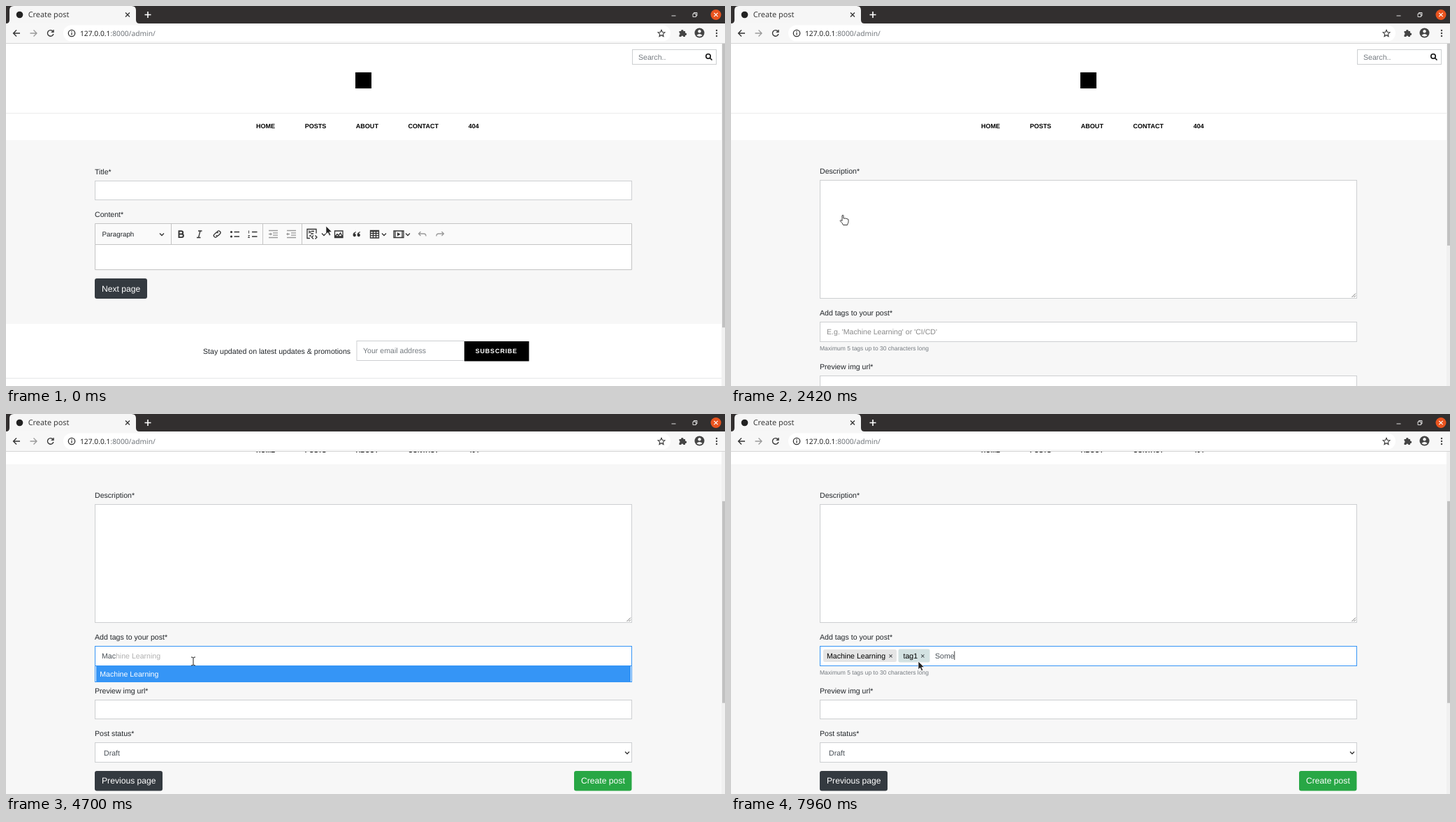
These frames come from a looping animation (1029x544 px, 8 s). An HTML page:

```html
<!DOCTYPE html>
<html lang="en">
<head>
<meta charset="utf-8">
<title>Create post</title>
<style>
  html, body { margin: 0; width: 100%; height: 100%; overflow: hidden; background: #fff; }
  svg { display: block; }
  text { font: 10.58px "Liberation Sans", Arial, sans-serif; fill: #212529; text-rendering: geometricPrecision; white-space: pre; }
  .nav text { font-size: 9.04px; font-weight: bold; fill: #000; }
  .ui text { font: 10.9px "Noto Sans", "Open Sans", sans-serif; fill: #3c3c3c; }
  .ui .url { font-size: 10.25px; fill: #222; }
  .field { fill: #fff; stroke: #cdcfd1; }
  .muted { fill: #757b80; }
  .foot text { fill: #838383; }
  .button text { font-size: 12.15px; fill: #fff; }
  .line { fill: none; stroke: #333; stroke-width: 1.3; }
  .off { stroke: #9a9a9a; }
</style>
</head>
<body>
<svg width="1029" height="544" viewBox="0 0 1029 544">
  <defs>
    <path id="chevron" class="line" d="M-3-1.5 0 1.5 3-1.5"/>
    <clipPath id="below"><path d="M120 361h790v200h-790z"/></clipPath>
  </defs>

  <g id="page">
    <rect class="field" x="896.5" y="62.5" width="120" height="21"/>
    <text class="muted" x="905" y="76.5">Search..</text>
    <g fill="none" stroke="#111" stroke-width="1.6"><circle cx="1005" cy="72" r="3.2"/><path d="m1007.3 74.3 3.2 3.2"/></g>
    <rect x="500" y="95" width="23" height="23"/>
    <path d="M0 153.5h1024" stroke="#ececec"/>
    <g class="nav">
      <text x="358" y="175">HOME</text><text x="427.7" y="175">POSTS</text><text x="500.8" y="175">ABOUT</text>
      <text x="575.5" y="175">CONTACT</text><text x="661.7" y="175">404</text>
    </g>

    <g id="write">
      <path d="M0 192h1024v263H0z" fill="#f7f7f7"/>
      <text x="127" y="240.5">Title*</text>
      <rect class="field" x="127.5" y="250.5" width="768" height="27"/>
      <text x="127" y="301.5">Content*</text>
      <g stroke="#c4c4c4">
        <path d="M127.5 311.5h768v30h-768z" fill="#fafafa"/>
        <path d="M127.5 341.5h768v36h-768z" fill="#fff"/>
        <path d="M236.5 312v29M367.5 312v29M423.5 312v29"/>
      </g>
      <text x="137.5" y="330" style="font-size:9.82px">Paragraph</text>
      <use href="#chevron" x="223" y="327"/><use href="#chevron" x="455" y="327"/>
      <use href="#chevron" x="541" y="327"/><use href="#chevron" x="575" y="327"/>
      <g class="line">
        <path d="M247.5 322.3h3.3q2.4 0 2.4 2.1t-2.4 2.1h-3.3h3.8q2.6 0 2.6 2.3t-2.6 2.3h-3.8z" stroke-width="1.9"/>
        <path d="M275 322h5.500M273 331.500h5.500M278 322l-2.500 9.500"/>
        <path d="m300.500 325 2.200-2.200a2.400 2.400 0 0 1 3.500 3.500l-2.200 2.200q-1.800 1.400-3.500-.300M303.800 328.200l-2.200 2.200a2.400 2.400 0 0 1-3.500-3.500l2.200-2.200q1.800-1.400 3.500.300"/>
        <path d="M326.500 323.500h7.500M326.500 330h7.500M352 323.500h7.500M352 330h7.500"/>
        <path d="M347.500 321.500v4M346.500 328.500h2l-2 3h2.500" stroke-width=".9"/>
        <path class="off" d="M376 321.500h13M382 324.800h7M382 328.100h7M376 331.500h13M376 326.500h4m-1.500-1.500 1.500 1.500-1.500 1.500M402 321.500h13M408 324.800h7M408 328.100h7M402 331.500h13M406 326.500h-4m1.500-1.500-1.500 1.500 1.500 1.500"/>
        <path d="M435 332.500h-4v-13h13v6M433 322l3 1.500-3 1.500M437 322.500h4M436 326h4M434 329h3M440 328.500l-2.500 2.500 2.500 2.500M442.500 328.500l2.500 2.500-2.500 2.500"/>
        <path d="M470.500 322h11.500v9.500h-11.500zM471 330l3-3.500 2 2 2.500-3.500 3 5z"/>
        <path d="M521.500 321.500h12v10.500h-12zM521.500 322.500h12M521.500 325.500h12M521.500 328.700h12M525.500 322v10M529.500 322v10"/>
        <path d="M555 322h14v9.500h-14zM557 322v9.500M567 322v9.500"/>
        <path class="off" d="M593.500 323l-3 3 3 3M591 326h7q3 0 3 3.500M623.500 323l3 3-3 3M626 326h-7q-3 0-3 3.500"/>
      </g>
      <g fill="#333">
        <circle cx="322.500" cy="323.500" r="1.600"/><circle cx="322.500" cy="330" r="1.600"/>
        <path d="M560 324v5.500l4.500-2.800zM501 323q-4.500 1-4.500 5a2.200 2.200 0 1 0 2.600-2.200q0-1.500 1.900-1.900zM507 323q-4.500 1-4.500 5a2.200 2.200 0 1 0 2.600-2.200q0-1.500 1.900-1.900z"/>
      </g>
      <g class="button"><rect id="next" x="127" y="390" width="75" height="29" rx="3"/><text x="137" y="408.500">Next page</text></g>
      <text x="282" y="497.500">Stay updated on latest updates &amp; promotions</text>
      <rect class="field" x="502" y="479.500" width="154" height="28"/>
      <text class="muted" x="511" y="497">Your email address</text>
      <path d="M656 480h92.500v28.500H656z"/>
      <text x="671.800" y="497" style="font-size:9.04px;font-weight:bold;letter-spacing:.75px;fill:#fff">SUBSCRIBE</text>
      <path d="M0 533h1024" stroke="#e2e3e5"/>
      <g class="foot">
        <rect x="144" y="576" width="14" height="14"/>
        <text x="456" y="590">Home</text><text x="493.500" y="590">About</text><text x="530" y="590">Contact</text>
        <g fill="#777"><circle cx="853" cy="586" r="4"/><circle cx="870" cy="586" r="4"/><circle cx="888.500" cy="586" r="4"/></g>
      </g>
    </g>

    <g id="details" transform="translate(0 120)">
      <path d="M0 72h1024v503H0z" fill="#f7f7f7"/>
      <text x="127" y="120">Description*</text>
      <rect class="field" x="127.500" y="129.500" width="768" height="169"/>
      <path d="m888.500 297 5.500-5.500m-2.500 5.500 2.500-2.500" stroke="#555" stroke-width=".8"/>
      <text x="127" y="323">Add tags to your post*</text>
      <rect id="tagField" class="field" x="127.500" y="332.500" width="768" height="28"/>
      <text class="muted" x="127" y="373" style="font-size:8.500px">Maximum 5 tags up to 30 characters long</text>
      <text x="127" y="399.500">Preview img url*</text>
      <rect class="field" x="127.500" y="409.500" width="768" height="27"/>
      <text x="127" y="461">Post status*</text>
      <rect class="field" x="127.500" y="470.500" width="768" height="28"/>
      <text x="140" y="488.500" style="fill:#495057">Draft</text>
      <use href="#chevron" x="889" y="485"/>
      <g class="button">
        <rect x="127" y="511" width="97" height="28.500" rx="3" fill="#343a40"/><text x="137" y="529">Previous page</text>
        <rect x="813" y="511" width="82.500" height="28.500" rx="3" fill="#28a745"/><text x="823" y="529">Create post</text>
      </g>
      <g id="tagA"><rect x="132" y="337" width="105" height="18" rx="2.300" fill="#e5e5e5"/><text x="137" y="349.500" style="fill:#000">Machine Learning</text><text x="225.500" y="349.500">×</text></g>
      <g id="tagB"><rect x="239.500" y="336.500" width="45" height="19" rx="2.300" fill="#d3e2e2"/><text x="246.500" y="349.500" style="fill:#000">tag1</text><text x="271.200" y="349.500">×</text></g>
      <text id="placeholder" y="349.500" style="fill:#8a8a8a">E.g. 'Machine Learning' or 'CI/CD'</text>
      <text id="entry" y="349.500"><tspan id="typed" fill="#495057"></tspan><tspan id="hint" fill="#b0b0b0"></tspan></text>
      <path id="caret" d="M.500 339.500v12.500" stroke="#111" stroke-width=".8"/>
      <g id="list" clip-path="url(#below)">
        <rect id="listBox" x="127.500" y="350" width="768" fill="#fff" stroke="#3595f6"/>
        <rect id="active" x="129" y="361" width="765" height="22" fill="#3595f6"/>
        <g id="items"></g>
      </g>
    </g>
  </g>

  <path d="M1024 54h5v490h-5z" fill="#f1f1f1"/>
  <rect id="thumb" x="1025" width="4" fill="#c1c1c1"/>

  <g class="ui">
    <path d="M0 0h1029v25H0z" fill="#322f2f"/>
    <path d="M0 25q5 0 5-5V6q0-6 6-6h169q6 0 6 6v14q0 5 5 5z" fill="#f6f6f6"/>
    <path d="M0 25h1029v28H0z" fill="#f7f7f7"/>
    <rect x="82" y="27.500" width="869" height="23" rx="11.500" fill="#fff"/>
    <path d="M0 53.500h1029" stroke="#d5d5d5"/>
    <circle cx="19.500" cy="12.500" r="4.800" fill="#222"/>
    <text x="31.700" y="16">Create post</text>
    <text class="url" x="106" y="42.500">127.0.0.1<tspan fill="#70757a">:8000/admin/</tspan></text>
    <path class="line" d="m171 9.500 6 6m0-6-6 6"/>
    <path d="M198.500 12.500h9m-4.500-4.500v9" stroke="#fff" stroke-width="1.600"/>
    <path d="M952.500 14h6M983 11h4.500v4.500h-4.500zM984.500 11V9.500h4.500v4.500h-1.500" fill="none" stroke="#ddd"/>
    <circle cx="1016" cy="12.500" r="7.500" fill="#e9541f"/>
    <path d="m1013.300 9.800 5.400 5.400m0-5.400-5.400 5.400" stroke="#fff" stroke-width="1.200"/>
    <g class="line" stroke-width="1.500">
      <path d="M20 39H10.500m4.500-4.500-4.500 4.500 4.500 4.500"/>
      <path class="off" d="M34.500 39H44m-4.500-4.500 4.500 4.500-4.500 4.500"/>
      <path d="M67.300 36.500a4.300 4.300 0 1 0 .600 3.500M68 34v3.300h-3.300"/>
      <circle cx="94" cy="39" r="4.700"/><path d="M94 38.300v3.200M94 36v1.200"/>
      <path d="m938 34.300 1.400 3.200 3.500.300-2.700 2.300.800 3.400-3-1.800-3 1.800.800-3.400-2.700-2.300 3.500-.300z" stroke-width="1.100"/>
    </g>
    <g fill="#444">
      <path d="M963.500 36h2.700a1.700 1.700 0 1 1 3.300 0h2.500v2.700a1.700 1.700 0 1 1 0 3.300v2h-2.700a1.500 1.500 0 0 0-3 0h-2.800v-2.700a1.600 1.600 0 0 0 0-3z"/>
      <circle cx="992.500" cy="38.500" r="7"/>
      <circle cx="1017" cy="35" r="1.200"/><circle cx="1017" cy="39" r="1.200"/><circle cx="1017" cy="43" r="1.200"/>
    </g>
    <g fill="#f7f7f7"><circle cx="992.500" cy="36.300" r="2.200"/><path d="M988.300 42q4.200-4 8.400 0-4.200 3.500-8.400 0z"/></g>
  </g>

  <g id="cursor">
    <path id="arrow" d="M0 0v11.800l2.700-2.400 2 4.300 2.100-1-2-4.100h3.700z" fill="#222" stroke="#fff" stroke-width=".7"/>
    <path id="beam" d="M-3-6q3 0 3 1.500 0-1.500 3-1.500M0-4.500v9M-3 6q3 0 3-1.500 0 1.500 3 1.500" fill="none" stroke="#222"/>
    <path id="hand" d="M-1 0q1.500-1.500 2 0v4q4-.500 7 1.500v4q-.800 1.800-1.500 4H.500q-1-3-4.500-6 1-1.800 3 0z" fill="#fff" stroke="#222" stroke-width=".9"/>
  </g>
</svg>

<script>
const LOOP = 8000;
const $ = id => document.getElementById(id);
const set = (id, attrs) => { for (const k in attrs) $(id).setAttribute(k, attrs[k]); };
const show = (id, on) => { $(id).style.display = on ? '' : 'none'; };
const clamp = u => Math.max(0, Math.min(1, u));
const ease = u => { u = clamp(u); return u * u * (3 - 2 * u); };
const latest = (keys, t) => keys.filter(k => k[0] <= t).pop();

// [start, end, distance] of each wheel scroll
const writeScrolls = [[340, 530, 40], [630, 820, 41], [1050, 1240, 20]];
const detailScrolls = [[2600, 3050, 120]];
const scrollAt = (moves, t) => Math.round(moves.reduce((y, [a, b, d]) => y + d * ease((t - a) / (b - a)), 0));

const pointer = [[0, 458, 315], [50, 457, 313], [150, 451, 305], [1610, 451, 305], [1800, 290, 311],
  [2000, 112, 289], [2240, 160, 298], [2600, 160, 302], [2940, 274, 294], [3190, 268, 354]];
const typing = [[0, ''], [3750, 'M'], [3940, 'Ma'], [4090, 'Mac'], [4880, ''], [5680, 'T'], [6150, 'Ta'],
  [6350, 'Tag'], [6770, ''], [7570, 'S'], [7770, 'So'], [7910, 'Som'], [7960, 'Some']];
const numbered = ['tag1', 'tag2', 'tag3', 'tag4'];
const lists = [[0, []], [3940, ['Machine Learning']], [4880, []],
  [6150, [...numbered, 'ta']], [6350, numbered], [6770, []]];
const caretOff = [[0, 3330], [4560, 4880], [5360, 5680], [7300, 7570]];
const within = (t, [a, b]) => t >= a && t < b;

for (let i = 0; i < 5; i++) {
  const item = document.createElementNS('http://www.w3.org/2000/svg', 'text');
  item.setAttribute('x', 134.3);
  $('items').append(item);
}

function pointerAt(t) {
  const i = pointer.findLastIndex(k => k[0] <= t), a = pointer[i], b = pointer[i + 1] || a;
  const u = b === a ? 0 : (t - a[0]) / (b[0] - a[0]);
  return [a[1] + (b[1] - a[1]) * u, a[2] + (b[2] - a[2]) * u];
}

// A new tag swells to 120% and settles back.
function drawTag(id, cx, start, t) {
  const u = clamp((t - start) / 300);
  const s = 1 + 0.2 * (u < 0.3 ? ease(u / 0.3) : 1 - ease((u - 0.3) / 0.7));
  show(id, t >= start);
  set(id, { transform: `translate(${cx} 346) scale(${s}) translate(${-cx} -346)` });
}

function drawList(t) {
  const items = latest(lists, t)[1], opened = t < 5000 ? 3940 : 6150;
  const shift = -5 * (1 - clamp((t - opened) / 200)) ** 3;
  const active = within(t, [4700, 4880]) || within(t, [6670, 6770]);
  show('list', items.length);
  show('active', active);
  set('listBox', { height: Math.round(items.length * 22.5 + shift) + 11 - 0.5 });
  [...$('items').children].forEach((el, i) => {
    el.textContent = items[i] || '';
    el.setAttribute('y', 376 + 22.3 * i + shift);
    el.style.fill = active && !i ? '#fff' : '';
  });
  return items;
}

function drawEntry(t, items) {
  const text = latest(typing, t)[1], x = t < 4880 ? 137 : t < 6770 ? 246.7 : 292;
  const suggest = items.length && !within(t, [6150, 6200]);
  $('typed').textContent = text;
  $('hint').textContent = suggest ? items[0].slice(text.length) : '';
  set('entry', { x });
  set('placeholder', { x });
  show('placeholder', !text);
  const width = text ? $('typed').getComputedTextLength() : 0;
  set('caret', { transform: `translate(${x + width - 0.3} 0)` });
  show('caret', !caretOff.some(span => within(t, span)));
}

function drawPointer(t) {
  const [x, y] = pointerAt(t);
  const hand = within(t, [1650, 2470]) && x >= 127 && x <= 202;
  const beam = within(t, [2470, 4880]);
  set('cursor', { transform: `translate(${x} ${y})` });
  show('cursor', !within(t, [4880, 6770]));
  show('hand', hand);
  show('beam', beam);
  show('arrow', !hand && !beam);
  set('next', { fill: hand ? '#23272b' : '#343a40' });
}

function draw() {
  const t = performance.now() % LOOP, details = t >= 2420;
  const scroll = scrollAt(details ? detailScrolls : writeScrolls, t), height = details ? 831 : 591;
  set('page', { transform: `translate(0 ${-scroll})` });
  set('thumb', { y: 54 + scroll * 490 / height, height: 490 * 490 / height });
  show('write', !details);
  show('details', details);
  $('tagField').style.stroke = t >= 3330 ? '#3595f6' : '';
  drawTag('tagA', 184.5, 4880, t);
  drawTag('tagB', 262, 6770, t);
  drawEntry(t, drawList(t));
  drawPointer(t);
  requestAnimationFrame(draw);
}
draw();
</script>
</body>
</html>
```
